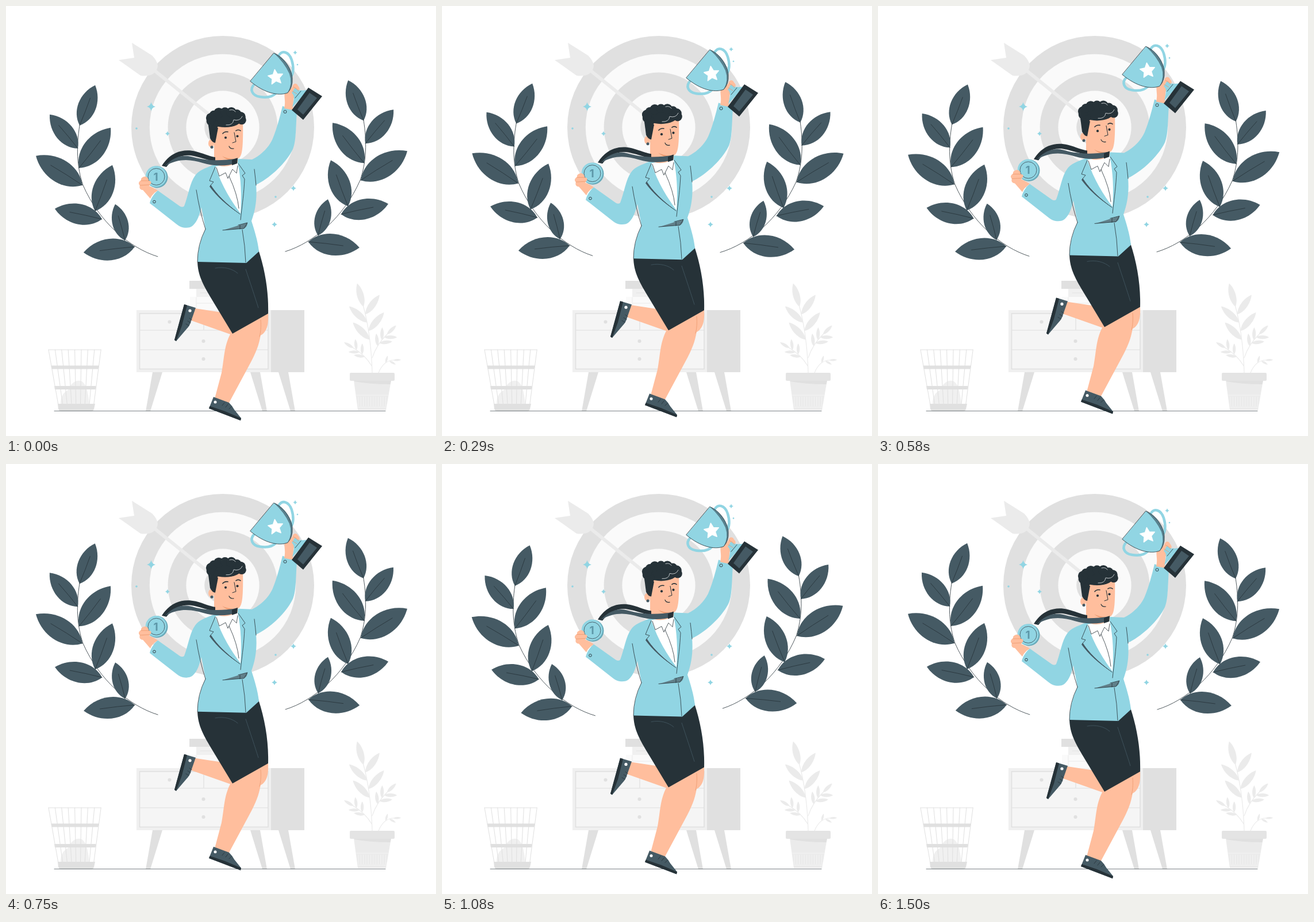
Animation, 748 px wide and 748 px high, one loop 1540 ms. Source, as an HTML page:

```html
<!DOCTYPE html>
<html lang="en">
<head>
<meta charset="utf-8">
<title>Winner</title>
<style>
html, body { margin: 0; width: 100%; height: 100%; overflow: hidden; background: #fff; }
svg { display: block; width: 100vw; height: 100vh; }
</style>
</head>
<body>
<svg id="stage" viewBox="0 0 748 748"></svg>
<script>
const TEAL = '#91d5e3', DARK = '#263238', SLATE = '#455a64', SKIN = '#ffbe9d', BLUSH = '#eb996e';
const G0 = '#e0e0e0', G1 = '#ebebeb', G2 = '#f0f0f0', G3 = '#f5f5f5', G4 = '#fafafa';

const fill = (d, c) => `<path d="${d}" fill="${c}"/>`;
const line = (d, c = DARK, w = 0.8) =>
  `<path d="${d}" fill="none" stroke="${c}" stroke-width="${w}" stroke-linecap="round" stroke-linejoin="round"/>`;
const dot = (x, y, r, c) => `<circle cx="${x}" cy="${y}" r="${r}" fill="${c}"/>`;
const ring = (x, y, r, c, w) => `<circle cx="${x}" cy="${y}" r="${r}" fill="none" stroke="${c}" stroke-width="${w}"/>`;
const oval = (x, y, rx, ry, c) => `<ellipse cx="${x}" cy="${y}" rx="${rx}" ry="${ry}" fill="${c}"/>`;
const box = (x, y, w, h, c) => `<rect x="${x}" y="${y}" width="${w}" height="${h}" fill="${c}"/>`;
const n = v => v.toFixed(1);
const repeat = (count, make) => Array.from({ length: count }, (_, i) => make(i)).join('');

function sparkle(x, y, r) {
  const q = r * 0.18;
  return fill(`M${x} ${y - r}Q${x + q} ${y - q} ${x + r} ${y}Q${x + q} ${y + q} ${x} ${y + r}` +
    `Q${x - q} ${y + q} ${x - r} ${y}Q${x - q} ${y - q} ${x} ${y - r}Z`, TEAL);
}

// Pointed leaf from base (x, y) to tip (u, v); plump is half width over length
function leaf(x, y, u, v, plump, color, vein) {
  const dx = u - x, dy = v - y, w = plump / 0.75;
  const at = (k, s) => `${n(x + dx * k - dy * w * s)} ${n(y + dy * k + dx * w * s)}`;
  return fill(`M${x} ${y}C${at(0.24, 1)} ${at(0.7, 1)} ${u} ${v}C${at(0.7, -1)} ${at(0.24, -1)} ${x} ${y}Z`, color) +
    (vein ? line(`M${x} ${y}Q${at(0.35, 0.04)} ${at(0.68, 0)}`, vein) : '');
}

function star(x, y, r, turn) {
  const d = repeat(10, i => {
    const a = turn + i * Math.PI / 5, k = i % 2 ? r * 0.48 : r;
    return (i ? 'L' : 'M') + n(x + k * Math.sin(a)) + ' ' + n(y - k * Math.cos(a));
  });
  return `<path d="${d}Z" fill="#fff" stroke="#fff" stroke-width="1.5" stroke-linejoin="round"/>`;
}

function target() {
  return repeat(5, i => dot(377, 211, 159 - i * 31.8, i % 2 ? G4 : G0)) + line('M258 112L372 204', G1, 6) +
    fill('M219 64L254 86Q263 95 264 104Q263 113 256 118Q247 123 234 121L196 94L223 90Z', G1);
}

function cabinet() {
  const leg = (x, s) => fill(`M${x} 637h${17 * s}l${12 * s} 68h${-8 * s}Z`, G0);
  return leg(272, -1) + leg(425, 1) + leg(474, 1) +
    box(319, 478, 70, 14, G0) + box(331, 492, 60, 14, G2) + line('M338 499H385', G0) +
    box(320, 506, 75, 23, G4) + line('M331 507V528M331 517H385', G2, 1.5) +
    box(227, 529, 234, 108, G2) + box(461, 529, 58, 108, G0) +
    `<rect x="232.5" y="535" width="223.5" height="96.5" fill="${G3}" stroke="${G0}" stroke-width="1.6"/>` +
    line('M233 564H456M233 598H456M344 535V564', G0, 1.2) +
    dot(284.5, 549.5, 3, G0) + dot(343.5, 583, 3, G0) + dot(343.5, 614, 3, G0);
}

function basket() {
  const mesh = 'M74 598H165' + repeat(9, i => `M${n(74 + i * 11.4)} 598L${n(91 + i * 7.7)} 694`);
  return fill('M95 694Q94 675 108 668Q116 650 130 652Q142 656 145 694Z', G2) + line(mesh, G0, 1) +
    fill('M78.5 625.5H161.5L160.5 631.5H79.5Z', G0) + fill('M84 661H156.5L155.5 667H85Z', G0) +
    fill('M90 692H155L153 701Q152 705 148 705H97Q92 705 91 701Z', G0);
}

// Curved twig with leaves on alternate sides and one at the tip
function sprig(x0, y0, cx, cy, x1, y1, count, size) {
  const leaves = repeat(count, i => {
    const t = 0.97 - i * 0.65 / count, u = 1 - t;
    const x = u * u * x0 + 2 * u * t * cx + t * t * x1, y = u * u * y0 + 2 * u * t * cy + t * t * y1;
    const bend = i ? (i % 2 ? 0.85 : -0.65) : 0;
    const a = Math.atan2(u * (cy - y0) + t * (y1 - cy), u * (cx - x0) + t * (x1 - cx)) + bend;
    return leaf(x, y, x + size * Math.cos(a), y + size * Math.sin(a), 0.14, G1);
  });
  return line(`M${x0} ${y0}Q${cx} ${cy} ${x1} ${y1}`, G1, 1.2) + leaves;
}

function plant() {
  return sprig(637, 638, 635, 570, 621, 520, 5, 42) + sprig(636, 626, 625, 607, 603, 594, 5, 19) +
    sprig(637, 612, 645, 588, 664, 570, 5, 22) + sprig(648, 638, 657, 616, 675, 616, 3, 13) +
    fill('M605 651H670L661 703H612Z', G1) + fill('M605 651H670L668.5 658Q632 658 606 653Z', G0) +
    line(repeat(12, i => `M${n(613 + i * 4.3)} 680v16`), G3) + line('M610 677H665M611 698H662', G3, 1) +
    `<rect x="598" y="638" width="78" height="14" rx="2" fill="#e4e4e4"/>`;
}

function branch() {
  const leaves = [
    [128, 208, 155, 138], [125, 248, 76, 189], [127, 282, 182, 212], [133, 312, 52, 261],
    [155, 357, 185, 277], [167, 371, 85, 353], [207, 408, 190, 345], [224, 419, 135, 429]];
  return line('M264 436C215 421 162 376 134 312C123 280 122 245 128 208') +
    leaves.map(p => leaf(...p, 0.21, SLATE, DARK)).join('');
}

const wreath = () => branch() + `<g transform="translate(750 -9) scale(-1 1)">${branch()}</g>`;

function legs() {
  return fill('M329 526L395 536L456 534C457 555 454 568 441 574L390 571L322 547Z', SKIN) +
    fill('M310 519L330 525L322 548Q320 556 314 562L296 583L293 581Z', SLATE) +
    fill('M310 519L315 520.5L306 556L296 583L293 581Z', DARK) + dot(320, 530, 2.6, '#fff') +
    line('M319 543l4 3m-7 2l5 3m-8 2l5 3') +
    fill('M393 566C379 588 380 612 375 638L363 683L387 692L423 625C435 603 440 590 443 572L445 540Z', SKIN) +
    line('M443 546C444 558 443 568 441 575', BLUSH) +
    fill('M361 680L388 690Q394 696 397 702L409 717L408 721L353 700Z', SLATE) +
    fill('M354.5 696L381 705L409 717L408 721L353 700Z', DARK) + dot(364, 689, 2.5, '#fff') +
    line('M376 695l4 -5m2 8l4 -5m2 8l4 -4');
}

function suit() {
  return fill('M333 442C333 470 345 488 359 512L394 570L456 535C457 498 451 460 439 424Z', DARK) +
    line('M364 456C379 453 394 457 403 465M417 458C425 482 433 506 439 525', SLATE) +
    fill('M362 276C346 282 334 287 329 295C320 307 317 330 310 348Q307 351 302 348L264 321C258 326 252 334 250 343L296 379' +
      'C305 387 318 388 325 382C333 375 337 362 340 350L347 388C340 402 333 425 333 445L418 447L440 427' +
      'C438 408 432 390 427 374C434 355 437 335 435 311C458 300 487 274 499 249C505 235 504 210 506 184' +
      'L481 174C476 195 471 213 465 228C459 245 443 260 428 267L404 266Z', TEAL) +
    line('M331 320Q337 358 347 388M333 445Q333 415 347 388M432 284Q434 300 435 312') +
    fill('M364 279L403 273C409 300 410 330 408 361C393 341 376 315 364 279Z', '#fff') +
    line('M366 281L371 296L382 290L386 300L394 284L401 291L403 278M388 296Q403 328 405 352') +
    line('M364 280L354 304L361 306L356 312C372 336 389 349 407 362') +
    fill('M356 311Q370 334 407 362Q373 340 354 314Z', SLATE) +
    line('M404 274L416 291L411 295L415 301C414 325 411 345 409 363L408 372') +
    fill('M377 390C392 386 408 380 420 377Q420 384 414 387Z', '#61808a') +
    line('M377 390L414 387L420 377L404 381M407 381V388M411 389Q416 417 417 446') +
    ring(258, 340.5, 2.3, DARK, 0.9) + ring(485.5, 184, 2.5, DARK, 0.9);
}

function medal() {
  return fill('M271 278C286 254 308 248 330 253C345 257 355 262 364 263V270C348 268 336 262 322 260C304 258 290 266 279 280Z', DARK) +
    fill('M276 279C290 263 306 258 322 262C342 268 370 271 402 265L401 273C385 279 362 279 342 273C322 267 300 264 276 279Z', SLATE) +
    fill('M393 268L403 264L402 274L393 277Z', DARK) +
    dot(262.5, 297.5, 19, '#67a9b9') + dot(261, 296.5, 18.3, TEAL) + ring(261.5, 297, 14.5, SLATE, 0.9) +
    `<text x="260.5" y="304" font-family="Inter, sans-serif" font-size="19" font-weight="700" text-anchor="middle" fill="#5d97a8">1</text>` +
    fill('M244 297C238 296 234 300 235 303C230 306 230 310 233 312C231 317 234 320 238 320L251 335Q255 326 264 321' +
      'C259 317 253 315 249 313L252 309Q254 304 248 304Q248 299 244 297Z', SKIN) +
    line('M235 304H248M233 312L249 311', BLUSH);
}

function head() {
  const curls = repeat(10, i => {
    const a = 3.75 - i * 0.42;
    return dot(n(383 + 27 * Math.cos(a)), n(198 - 14 * Math.sin(a)), 8.8 - i % 2, DARK);
  });
  return fill('M362 205V274Q380 285 403 272V266C411 262 413 250 412 194L385 190Z', SKIN) +
    fill('M376 261Q386 267 401 266Q388 272 376 261Z', BLUSH) +
    oval(357, 239, 5, 7, SKIN) + dot(358, 245.5, 2.5, SLATE) +
    fill('M352 207L355 230Q359 238 364 238L369 212Z', DARK) + oval(381, 197, 29, 14, DARK) + curls +
    line('M383 207Q395 208 396 198Q407 201 411 192M389 181Q396 179 399 184', '#e5e9ea') +
    dot(382, 229, 2.1, DARK) + dot(402.5, 226.5, 2.1, DARK) +
    line('M377 222Q380 218 386 219M400 217Q404 214 408 217', DARK, 1.6) +
    line('M397 220L400 236L394 238', DARK, 1) + line('M388 244Q390 249 396 248', DARK, 1.2);
}

function trophy() {
  const rim = 'M466 82C482 88 497 108 498 126Q499 141 490 151';
  const cup = rim + 'C474 157 450 152 425 131Z';
  return line('M474 87C480 76 492 79 497 94C501 107 500 116 496 123M432 136C423 145 428 156 442 158C455 160 464 158 470 151', TEAL, 4.5) +
    fill('M484 178C487 164 483 158 485 151L498 141C499 134 506 133 508 139Q513 143 509 149L500 161L499 181Z', SKIN) +
    fill('M497 151C504 158 500 166 498 176L526 146C514 147 507 148 503 142Z', TEAL) +
    line('M500 141Q506 143 509 148M498 148L506 153', BLUSH) + line('M503 160L513 148') +
    fill(cup, TEAL) + fill(rim + 'Q499 135 493 118Q484 98 466 82Z', '#58808d') + line(cup) +
    star(469, 124, 13.5, -0.12) +
    fill('M526 142L550 157L517 198L497 181Z', DARK) + fill('M528 151L541 160L517 189L507 180Z', SLATE) +
    sparkle(503, 81, 3.8) + dot(507, 102, 1.3, TEAL);
}

document.getElementById('stage').innerHTML =
  target() + cabinet() + basket() + plant() + line('M84 704.5H660', DARK, 0.6) +
  sparkle(252.5, 175, 7.5) + dot(227, 213, 1.8, TEAL) + sparkle(281, 222, 4.5) +
  sparkle(500, 317, 5) + dot(469, 332, 1.8, TEAL) + sparkle(467, 380, 5) +
  `<g id="wreath">${wreath()}</g><g id="woman">${legs()}${suit()}${head()}${medal()}${trophy()}</g>`;

const woman = document.getElementById('woman'), branches = document.getElementById('wreath');
const LOOP = 1540, CYCLE = 1500, LEAD = 20;
const tri = p => 1 - Math.abs(1 - 2 * (p % 1));

function draw(ms) {
  const p = ((ms % LOOP + LEAD) % CYCLE) / CYCLE;
  const lift = 15 * tri(p);
  const sway = 2 * tri(p + 0.25) - 1;
  woman.setAttribute('transform', `translate(0 ${(0.4 - lift).toFixed(3)})`);
  branches.setAttribute('transform', `rotate(${sway.toFixed(4)} 374.5 286)`);
}

const start = performance.now();
function tick() {
  draw(performance.now() - start);
  requestAnimationFrame(tick);
}
draw(0);
requestAnimationFrame(tick);
</script>
</body>
</html>
```
